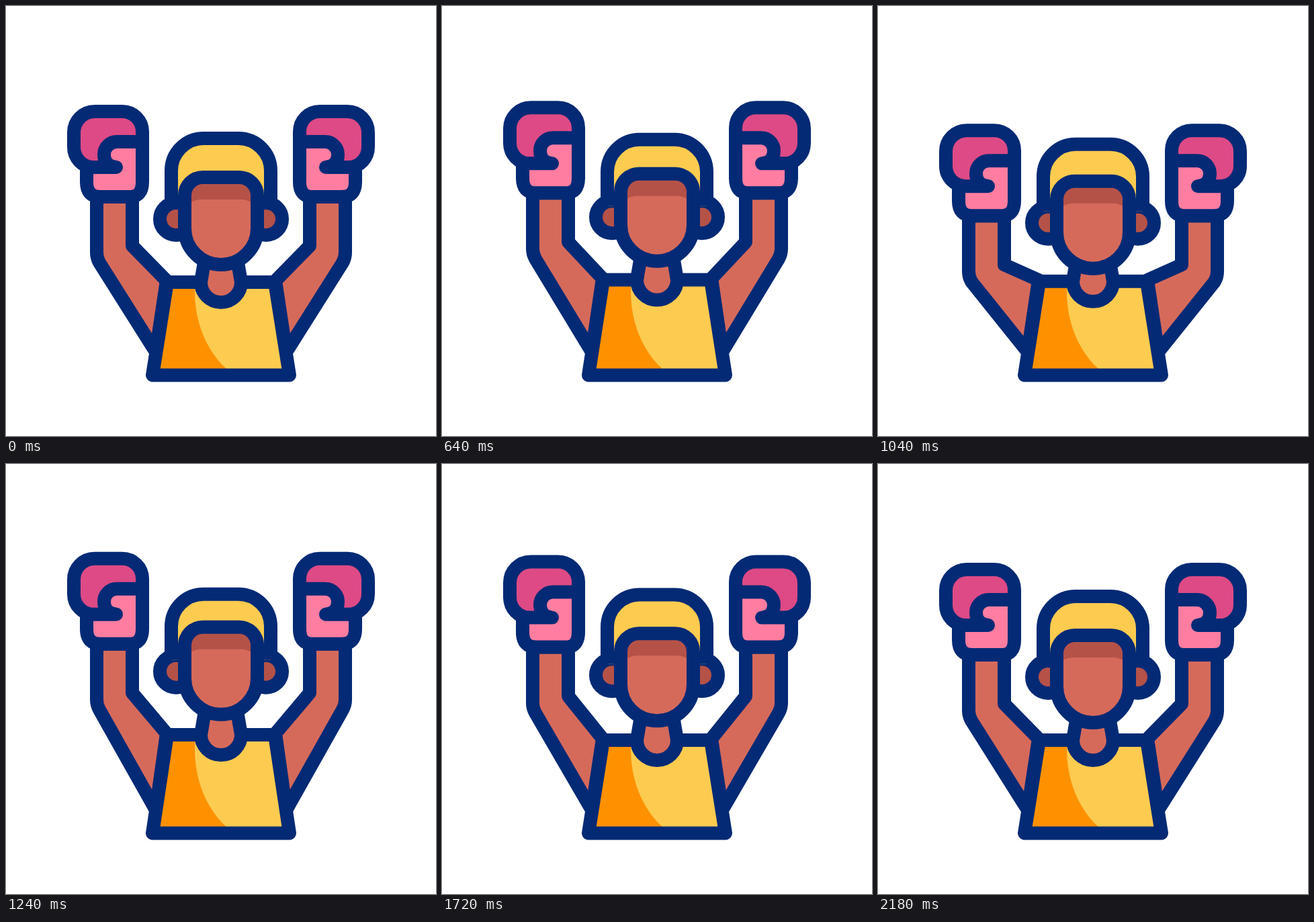
An HTML page that plays this animation: 640 px wide and 640 px high, repeating every 2.36 s.

```html
<!DOCTYPE html>
<html lang="en">
<head>
<meta charset="utf-8">
<title>Cheering boxer</title>
<style>
  html, body { margin: 0; width: 100%; height: 100%; overflow: hidden; background: #fff; }
  svg { display: block; width: 100%; height: 100%; }
  .line { stroke: #042a75; stroke-width: 20; stroke-linejoin: round; }
  .open { fill: none; }
  .cap { stroke-linecap: round; }
  .skin { fill: #d56a5b; }
  .shade { fill: #b55248; }
  .yellow { fill: #fdcb50; }
  .orange { fill: #ff9100; }
  .pink { fill: #ff7da1; }
  .magenta { fill: #dd4a85; }
</style>
</head>
<body>
<svg viewBox="0 0 640 640">
  <defs>
    <clipPath id="shirtClip"><path id="shirtShape"/></clipPath>
    <clipPath id="faceClip"><path id="faceShape"/></clipPath>
  </defs>

  <g id="side">
    <path id="arm" class="line skin"/>
    <g id="glove">
      <path class="pink" d="M120 239V263Q120 284 139 284H184Q203 284 203 263V190H140Z"/>
      <path class="magenta" d="M203 202H165A19 18.7 0 0 0 150 232V240H130A29 30 0 0 1 101 210V188A31 31 0 0 1 132 157H173A30 30 0 0 1 203 187Z"/>
      <path class="line open cap" d="M120 239V262Q120 284 140 284H184Q203 284 203 262V187A30 30 0 0 0 173 157H132A31 31 0 0 0 101 188V210A29 30 0 0 0 130 240H164Q146 238 146 221A19 19 0 0 1 165 202H203"/>
    </g>
  </g>
  <use href="#side" transform="matrix(-1 0 0 1 640 0)"/>

  <g clip-path="url(#shirtClip)">
    <rect class="orange" x="200" y="380" width="240" height="180"/>
    <path class="yellow" d="M281 380V425C281 470 298 513 328 540V560H440V380Z"/>
  </g>
  <path id="shirt" class="line open cap"/>
  <path id="neck" class="line skin" d="M297 370L290 411A30 30 0 0 0 350 411L343 370"/>

  <g id="ears" class="line shade">
    <circle cx="253" cy="317" r="24"/>
    <circle cx="387" cy="317" r="24"/>
  </g>
  <path id="hair" class="line yellow"/>
  <g clip-path="url(#faceClip)">
    <rect class="skin" x="260" y="200" width="120" height="220"/>
    <path id="brow" class="shade" d="M266 245H374V302Q365 288 350 288H290Q275 288 266 302Z"/>
  </g>
  <path id="face" class="line open"/>
</svg>

<script>
const LOOP = 2360;

// Downward offsets; crown and face are relative to the head.
const rest   = { glove: 0,   chest: 0,  head: 0,    crown: 0, face: 0 };
const dip    = { glove: 18,  chest: 6,  head: 9,    crown: 4, face: 0.5 };
const cheer  = { glove: -17, chest: -8, head: -8.5, crown: 5, face: -4 };
const squat  = { glove: 29,  chest: -1, head: 6,    crown: 3, face: 0 };
const settle = { glove: -17, chest: 0,  head: -4,   crown: 0, face: 0 };

const beats = [
  [0, rest], [100, rest], [420, dip], [780, cheer], [1020, squat],
  [1260, cheer], [1520, squat], [1780, settle], [2180, rest], [LOOP, rest]
];

const el = id => document.getElementById(id);
const shape = (id, d) => el(id).setAttribute('d', d);
const shift = (id, y) => el(id).setAttribute('transform', `translate(0 ${y})`);
const ease = u => (1 - Math.cos(Math.PI * u)) / 2;

function poseAt(t) {
  const i = beats.findIndex(([time]) => time > t);
  const [t0, from] = beats[i - 1], [t1, to] = beats[i];
  const w = ease((t - t0) / (t1 - t0));
  const pose = {};
  for (const part in from) pose[part] = from[part] + (to[part] - from[part]) * w;
  return pose;
}

function draw({ glove, chest, head, crown, face }) {
  // The arms stretch between the moving gloves and the shirt.
  const wrist = 284 + glove, elbow = 357 + glove, top = 411 + chest;
  shift('glove', glove);
  shape('arm', `M135 ${wrist}V${elbow + 10}Q135 ${elbow + 18} 139 ${elbow + 25}L223 515L239 ${top - 2}L188 ${elbow}V${wrist}Z`);

  const hem = `${top}L218 549.5H422L400 ${top}`;
  shape('shirt', `M290 ${top}H240 V${hem}H350`);
  shape('shirtShape', `M240 ${hem}Z`);
  shift('neck', chest);

  const hair = 197 + head + crown, temple = 300 + head;
  shift('ears', head);
  shape('hair', `M246 ${temple}V${hair + 48}A48 48 0 0 1 294 ${hair}H346A48 48 0 0 1 394 ${hair + 48}V${temple}`);

  const fringe = 255 + head + face, jaw = 331 + head + face;
  const outline = `M266 ${fringe + 27}A27 27 0 0 1 293 ${fringe}H347A27 27 0 0 1 374 ${fringe + 27}V${jaw}A54 54 0 0 1 266 ${jaw}Z`;
  shape('face', outline);
  shape('faceShape', outline);
  shift('brow', head + face);
}

const start = performance.now();
function tick() {
  draw(poseAt((performance.now() - start) % LOOP));
  requestAnimationFrame(tick);
}
tick();
</script>
</body>
</html>
```
